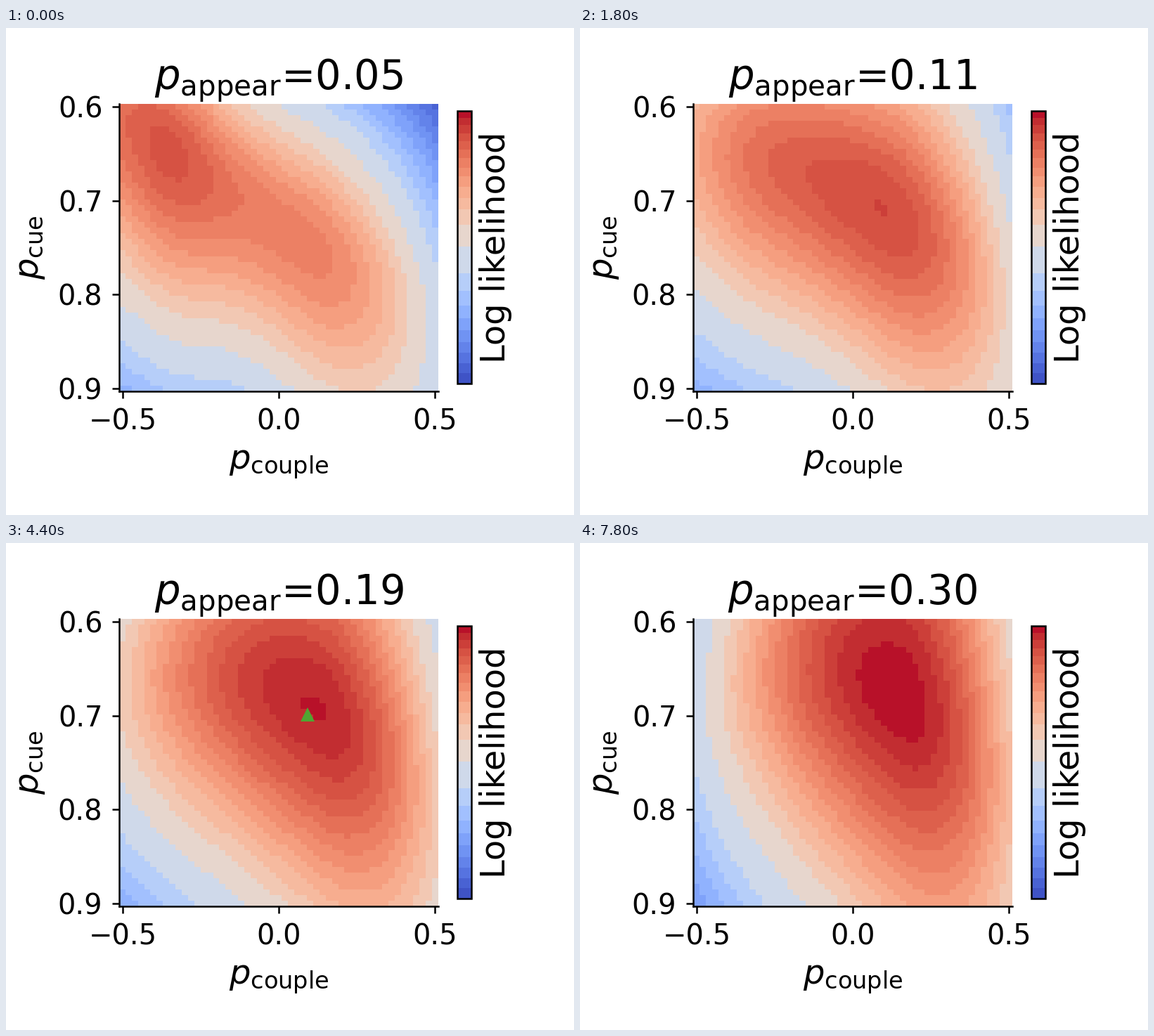
A matplotlib script that plays this animation: 808x693 px, repeating every 8000 ms.

```python
import numpy as np
import matplotlib.pyplot as plt
from matplotlib.animation import FuncAnimation
from matplotlib.colors import BoundaryNorm, ListedColormap
from matplotlib.patches import Rectangle

W, H, DPI = 808, 693, 288
PT = 72 / DPI  # points per pixel
FRAMES, INTERVAL = 40, 200
LINE = 2.5 * PT
P_MIN, P_MAX = .05, .30

plt.rcParams.update({"font.family": "DejaVu Sans", "mathtext.fontset": "dejavusans",
                     "font.size": 10})


def bands(n):
    """Band edges from the middle of the scale outwards, narrowing on the way."""
    return .5 * (np.arange(n + 1) / n) ** .7


edges = np.concatenate([.5 - bands(10)[:0:-1], .5 + bands(13)])
cmap = ListedColormap(plt.cm.coolwarm((edges[:-1] + edges[1:]) / 2))
norm = BoundaryNorm(edges, cmap.N)

x, q = np.meshgrid(np.linspace(-.5, .5, 51), np.linspace(.6, .9, 51))
p_appear = np.linspace(P_MIN, P_MAX, FRAMES)


def likelihood(p):
    """A curved ridge over p_couple with hyperbolic slopes along p_cue."""
    t = (p - P_MIN) / (P_MAX - P_MIN)
    ease = np.sqrt(t)

    # Height along the ridge, with a second summit that fades out
    d = x - (.08 + .07 * t)
    bend = np.where(d < 0, 1.28 * ease, 2 + .8 * t)
    height = 1 - .19 * np.exp(-t / .28) - bend * d ** 2
    height += .09 * np.exp(-t / .2 - ((x + .35) / .17) ** 2)

    # Distance from the ridge line and steepness on either side
    ridge = .725 - .068 * ease + (.22 - .127 * ease) * x + .31 * ease * x ** 2
    off = q - ridge
    steep = (3.2 - 1.1 * t) * (1 - 1.2 * (x + .15) ** 2)
    steep = steep * np.where(off < 0, 1.5 - .7 * ease, 1)
    drop = steep * (np.hypot(off, .085) - .085)
    return np.clip(height - drop, 0, .999)


fig = plt.figure(figsize=(W / DPI, H / DPI), dpi=DPI, facecolor="white")


def panel(x0, y0, x1, y1):
    return fig.add_axes([x0 / W, 1 - y1 / H, (x1 - x0) / W, (y1 - y0) / H])


ax = panel(161.4, 108, 614.6, 516.6)
image = ax.imshow(likelihood(P_MIN), cmap=cmap, norm=norm, aspect="auto",
                  interpolation="nearest", extent=(-.51, .51, .903, .597))
ax.set_xticks([-.5, 0, .5])
ax.set_yticks([.6, .7, .8, .9])
ax.tick_params(length=10 * PT, width=LINE, pad=3.5, labelsize=10)
ax.set_xlabel(r"$p_{\mathrm{couple}}$", fontsize=12, labelpad=4)
ax.set_ylabel(r"$p_{\mathrm{cue}}$", fontsize=12, labelpad=4)
title = ax.set_title("", fontsize=14.4, pad=5, y=1)
for side, spine in ax.spines.items():
    spine.set_linewidth(LINE)
    spine.set_visible(side in ("left", "bottom"))

truth, = ax.plot(.0912, .6985, "^", ms=20 * PT, color="#4fa632", mew=0, visible=False)
best, = ax.plot(.1325, .660, "v", ms=18 * PT, color="#be202f", mew=0, visible=False)
truth_at, best_at = (np.abs(p_appear - p).argmin() for p in (.19, .24))

bar = panel(642.2, 118, 662.4, 506.4)
bar.imshow(np.linspace(.999, 0, 256)[:, None], cmap=cmap, norm=norm, aspect="auto",
           interpolation="nearest")
bar.axis("off")
bar.add_patch(Rectangle((0, 0), 1, 1, transform=bar.transAxes, fill=False,
                        ec="black", lw=LINE, clip_on=False))
fig.text(710.4 / W, 1 - 312 / H, "Log likelihood", fontsize=12, ha="center",
         va="baseline", rotation=90, rotation_mode="anchor")


def update(i):
    p = p_appear[i]
    image.set_data(likelihood(p))
    title.set_text(rf"$p_{{\mathrm{{appear}}}}$={p:.2f}")
    truth.set_visible(i == truth_at)
    best.set_visible(i == best_at)
    return image, title, truth, best


anim = FuncAnimation(fig, update, frames=FRAMES, interval=INTERVAL,
                     repeat=True, repeat_delay=0, blit=False)
plt.show()
```
